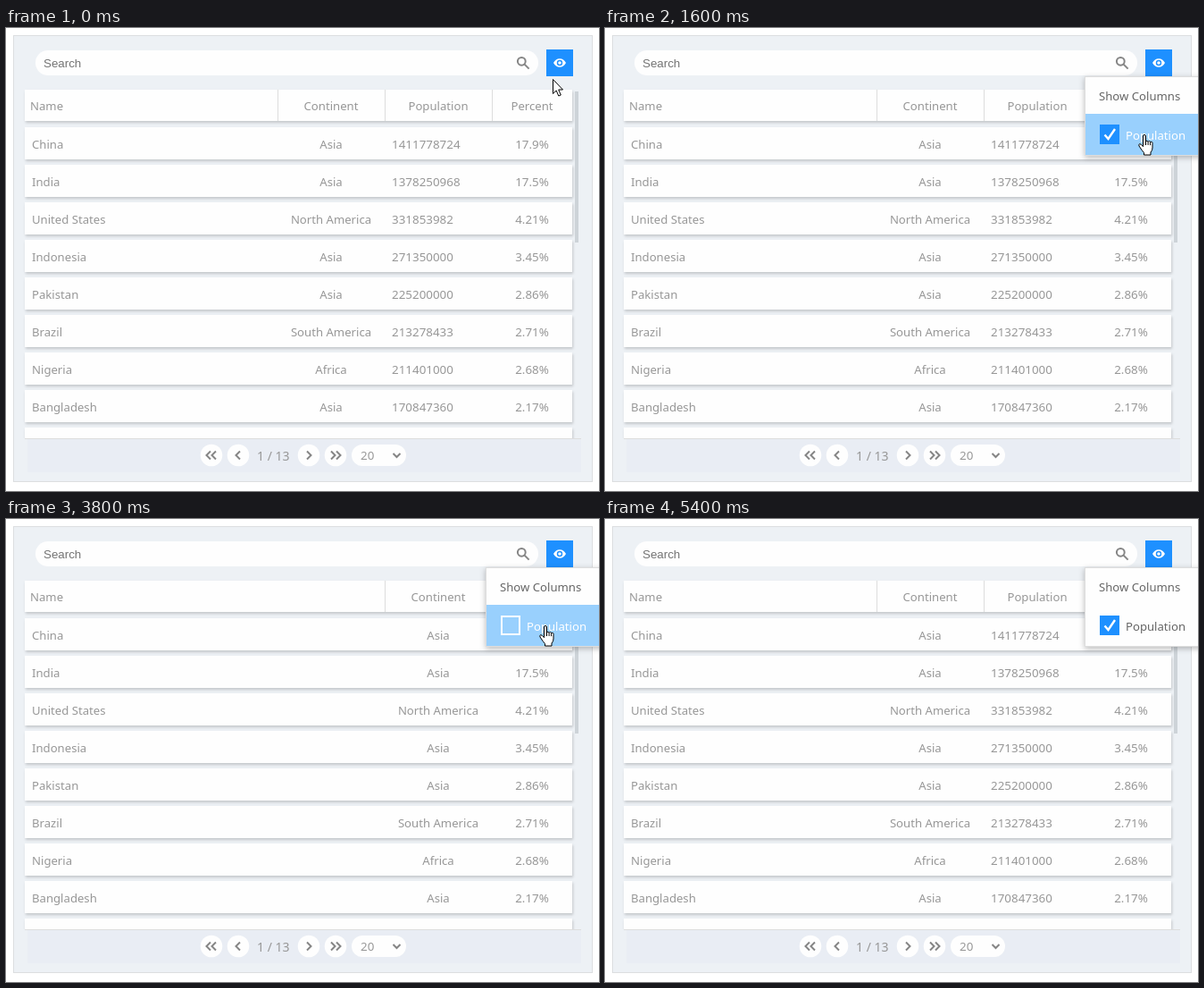
An HTML page for the animation above (5.8 s loop, 664 px wide and 518 px high).

```html
<!DOCTYPE html>
<html lang="en">
<head>
<meta charset="utf-8">
<title>Table with column chooser</title>
<style>
  html, body { margin: 0; width: 100%; height: 100%; overflow: hidden; background: #fff; }
  svg { display: block; font: 13.15px "Noto Sans", sans-serif; fill: #979797; }
  .mid { text-anchor: middle; }
  .num { font-size: 13.4px; }
  .white { fill: #fefefe; }
  .raised { fill: #fefefe; filter: drop-shadow(1px 2.5px 1.7px #0000002c); }
  .rule { stroke: #ddd; fill: none; }
  .icon { stroke: #858585; stroke-width: 2; fill: none; }
  .menu { fill: #666; }
  .hover { fill: #99d0fd; }
  .cursor { fill: #fff; stroke: #000; stroke-linejoin: round; }
</style>
</head>
<body>
<svg width="664" height="518" viewBox="0 0 664 518">
  <clipPath id="body"><rect x="9" y="60" width="648" height="399"/></clipPath>

  <rect x="8.5" y="8.5" width="648" height="499" fill="#edf1f5" stroke="#dcdee0"/>
  <rect class="white" x="33" y="25" width="563" height="28" rx="14"/>
  <text x="42" y="44" fill="#737373" style="font: 13.33px 'Liberation Sans', sans-serif">Search</text>
  <g class="icon"><circle cx="577.3" cy="37.3" r="4.4"/><path d="M580.6 40.6l5 5"/></g>
  <rect x="605" y="24" width="30" height="30" fill="#1e90ff"/>
  <path class="white" d="M613 39Q615.5 34.2 620 34.2T627 39Q624.5 43.8 620 43.8T613 39"/>
  <circle cx="620" cy="39" r="2.5" fill="none" stroke="#1e90ff" stroke-width="1.4"/>

  <g id="table" clip-path="url(#body)"></g>
  <rect x="637" y="71" width="4" height="169" fill="#cdd3d8"/>

  <rect x="24" y="460" width="620" height="37" fill="#e9edf4"/>
  <path class="rule" d="M21 459.5H644"/>
  <g class="white">
    <circle cx="230" cy="478" r="12.3"/><circle cx="260" cy="478" r="12.3"/>
    <circle cx="339" cy="478" r="12.3"/><circle cx="369" cy="478" r="12.3"/>
    <rect x="387" y="466" width="61" height="24" rx="12"/>
  </g>
  <path class="icon" d="M229 473.5l-4.5 4.5 4.5 4.5m6-9l-4.5 4.5 4.5 4.5M262 473.5l-4.5 4.5 4.5 4.5
    M337 473.5l4.5 4.5-4.5 4.5M364 473.5l4.5 4.5-4.5 4.5m6-9l4.5 4.5-4.5 4.5M433.5 476l4 4 4-4"/>
  <text x="281" y="484" style="font-size: 14px">1 / 13</text>
  <text x="397" y="483" class="num">20</text>

  <g id="popup">
    <rect x="537.5" y="54.5" width="140" height="88" fill="#fefefe" stroke="#ddd"
      style="filter: drop-shadow(0 2px 3px #0004)"/>
    <rect id="titleHover" class="hover" x="538" y="54" width="126" height="42"/>
    <rect id="itemHover" class="hover" x="538" y="96" width="126" height="46"/>
    <text id="title" class="menu" x="553" y="81">Show Columns</text>
    <text id="item" class="menu" x="583" y="125">Population</text>
    <rect id="unchecked" x="555" y="109" width="20" height="20" fill="none" stroke="#fff" stroke-width="2"/>
    <g id="checked">
      <rect x="554" y="108" width="22" height="22" fill="#1e90ff"/>
      <path d="M559.5 119.5l4 4.5 7.5-11" fill="none" stroke="#fff" stroke-width="2.4"/>
    </g>
  </g>

  <path id="hand" class="cursor" d="M6 13V2a1.5 1.5 0 0 1 3 0V8a1.4 1.4 0 0 1 2.6.5 1.3 1.3 0 0 1 2.5.7
    1.3 1.3 0 0 1 2.4 1V15q0 3-2 5v3H7v-2.5q-2-2-5.5-7.5-.8-2 .8-2.3 1.5 0 3.7 3zM9 8v4M11.6 8.5v3.5M14.1 9.2v3"/>
  <path id="arrow" class="cursor" d="M.5.5V16.5l3.7-3.5 2.6 6 2.5-1-2.6-6H11.5z"/>
</svg>
<script>
const LOOP = 5800;
const countries = [
  ["China", "Asia", "1411778724", "17.9%"],
  ["India", "Asia", "1378250968", "17.5%"],
  ["United States", "North America", "331853982", "4.21%"],
  ["Indonesia", "Asia", "271350000", "3.45%"],
  ["Pakistan", "Asia", "225200000", "2.86%"],
  ["Brazil", "South America", "213278433", "2.71%"],
  ["Nigeria", "Africa", "211401000", "2.68%"],
  ["Bangladesh", "Asia", "170847360", "2.17%"],
];
// Pointer stops: start time, shape, left, top
const pointer = [
  [0, "arrow", 612, 57], [200, "hand", 612, 46], [400, "hand", 612, 43], [600, "hand", 615, 40],
  [1000, "hand", 604, 102], [1200, "hand", 594, 88], [1400, "hand", 596.5, 119],
  [4400, "hand", 585.5, 123], [4600, "arrow", 400, 305], [4800, "arrow", 207, 495], [5000, "none", 0, 0],
];

const el = id => document.getElementById(id);
const show = (id, on) => el(id).setAttribute("visibility", on ? "inherit" : "hidden");
const text = (x, y, str, cls = "") => `<text x="${x}" y="${y}" class="${cls}">${str}</text>`;
const panel = (y, h) => `<rect class="raised" x="21" y="${y}" width="613" height="${h}"/>`;

function tableMarkup(full) {
  const continentX = full ? 364 : 484;
  const edges = full ? [304.5, 424.5, 544.5] : [424.5, 544.5];
  let out = panel(69, 35) + edges.map(x => `<path class="rule" d="M${x} 69v35"/>`).join("")
    + text(27, 92, "Name") + text(continentX, 92, "Continent", "mid") + text(589, 92, "Percent", "mid");
  if (full) out += text(484, 92, "Population", "mid");
  countries.forEach(([name, continent, population, percent], i) => {
    const y = 111 + 42 * i, base = y + 24;
    out += panel(y, 36) + text(29, base, name) + text(continentX, base, continent, "mid")
      + text(589, base, percent, "mid num");
    if (full) out += text(432, base, population, "num");
  });
  return out + panel(111 + 42 * countries.length, 36);
}

el("table").innerHTML = `<g id="full">${tableMarkup(true)}</g><g id="reduced">${tableMarkup(false)}</g>`;

function draw(now) {
  const t = now % LOOP;
  const within = (from, to) => t >= from && t < to;
  const columnOff = within(2000, 3000) || within(3800, 4400);
  const onTitle = within(1200, 1400), onItem = within(1400, 4600);

  show("full", !columnOff);
  show("reduced", columnOff);
  show("popup", t >= 800);
  show("titleHover", onTitle);
  show("itemHover", onItem);
  show("checked", !columnOff);
  show("unchecked", columnOff);
  el("title").style.fill = onTitle ? "#fff" : "";
  el("item").style.fill = onItem ? "#fff" : "";

  const [, shape, x, y] = pointer.findLast(stop => t >= stop[0]);
  for (const id of ["hand", "arrow"]) {
    show(id, id === shape);
    el(id).setAttribute("transform", `translate(${x} ${y})`);
  }
  requestAnimationFrame(() => draw(performance.now() - start));
}
const start = performance.now();
draw(0);
</script>
</body>
</html>
```
